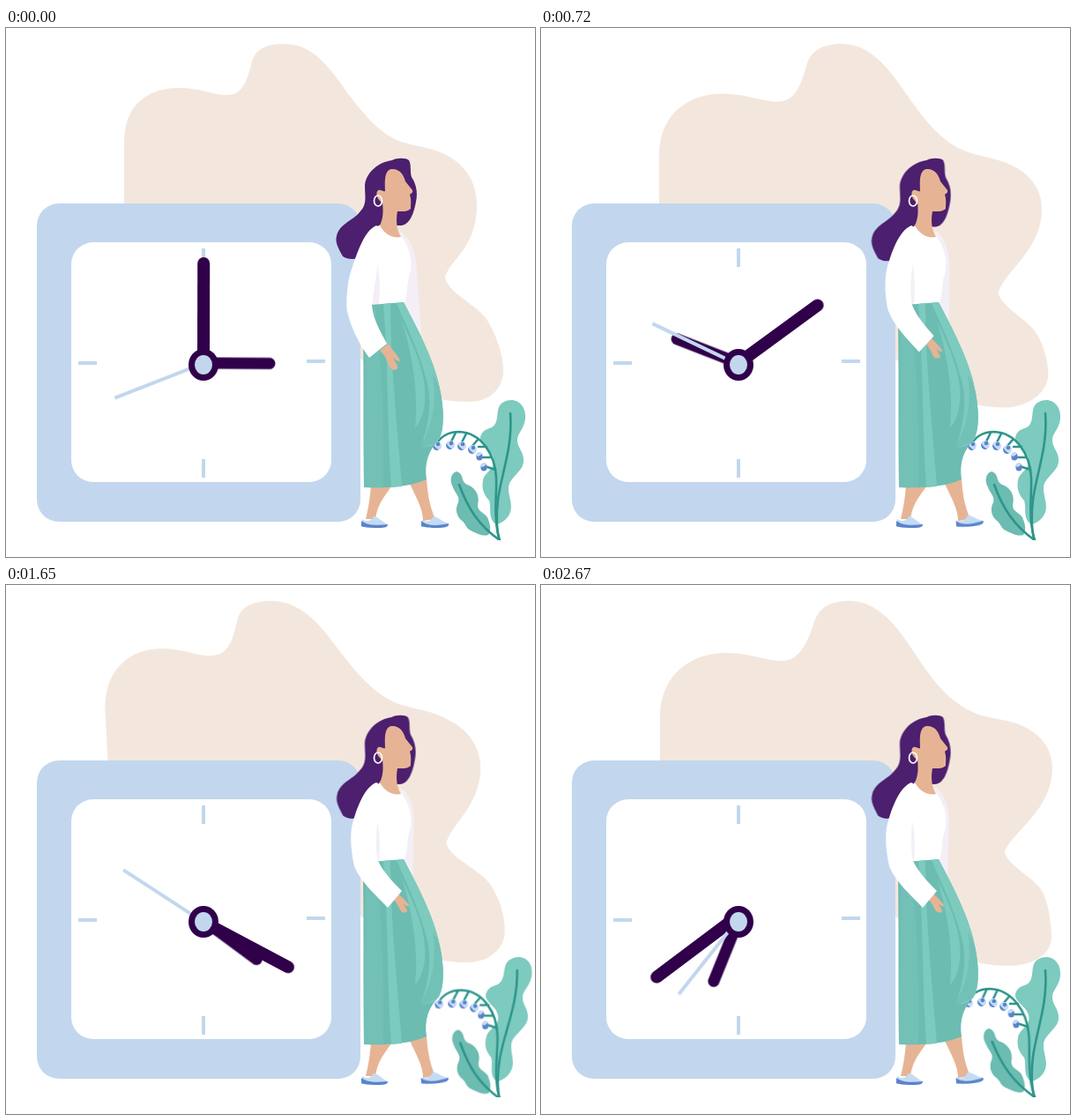
An HTML page that plays this animation: 600 by 600 pixels, repeating every 2.7 s.

```html
<!DOCTYPE html>
<html lang="en">
<head>
<meta charset="utf-8">
<title>Time passing</title>
<style>
html, body { margin: 0; width: 100%; height: 100%; overflow: hidden; background: #fff; }
svg { display: block; width: 100vw; height: 100vh; }

.blob, .arm, .hand, .back-arm, .hair, .shoe, .leaf, .stem, .clock-hand {
  animation: 2700ms linear infinite;
}

/* background shape */
.blob { fill: #f3e7dd; animation-name: blob; }
@keyframes blob {
  0% {
    d: path("M134 300L134 130C134 85 163 68 196 68C222 68 234 76 251 76C268 76 273 60 278 42C281 27 290 18 316 18C352 18 371 52 390 77C406 98 424 120 448 129C466 135 484 135 503 146C522 157 534 176 534 200C534 250 504 262 498 282C500 300 534 314 545 330C556 348 564 370 564 388C564 410 548 424 525 424C470 424 430 400 402 375L300 375Z");
    animation-timing-function: cubic-bezier(.33, .33, .6, 1);
  }
  33.33% {
    d: path("M134 300L134 145C134 98 168 75 206 75C234 75 250 84 270 84C290 84 296 64 302 45C306 27 318 18 343 18C380 18 403 56 423 85C441 110 459 131 483 140C501 147 520 148 539 158C558 168 570 184 570 206C570 252 526 278 520 301C523 318 555 332 564 349C572 362 576 382 576 393C576 416 549 431 526 431C470 431 430 402 402 375L300 375Z");
    animation-timing-function: cubic-bezier(.4, .15, .6, .95);
  }
  66.67% {
    d: path("M120 300L111 145C108 95 140 72 173 72C200 72 212 80 229 80C250 80 254 62 259 42C262 27 272 18 298 18C336 18 359 53 379 79C396 101 417 125 444 135C462 141 480 142 498 152C522 163 536 184 536 208C536 250 502 272 498 292C502 310 538 322 549 340C560 358 565 374 565 392C565 414 546 428 523 428C470 428 430 402 402 375L300 375Z");
    animation-timing-function: cubic-bezier(.4, .1, .6, 1);
  }
  100% {
    d: path("M135 300L135 150C135 100 172 77 210 77C238 77 254 86 273 86C295 86 303 62 309 45C314 27 326 18 350 18C388 18 411 58 431 88C450 116 468 135 494 146C513 153 530 152 549 161C568 171 580 186 580 208C580 256 532 282 526 303C530 320 562 332 570 350C576 364 579 386 579 400C579 420 556 432 530 432C474 432 430 404 402 376L300 375Z");
  }
}

/* clock */
.clock-hand { fill: none; stroke: #30004a; stroke-linecap: round; }
.hour { transform-origin: 224px 380px; stroke-width: 13; animation-name: hour; }
.minute { transform-origin: 222px 379px; stroke-width: 14; animation-name: minute; }
.second { transform-origin: 222px 381px; stroke: #c2d7ee; stroke-width: 4; stroke-linecap: butt; animation-name: second; }
@keyframes hour {
  0% { transform: rotate(90deg); animation-timing-function: cubic-bezier(.33, .38, .67, .71); }
  11.11% { transform: rotate(193.2deg); animation-timing-function: cubic-bezier(.33, .43, .67, .62); }
  26.67% { transform: rotate(291deg); animation-timing-function: cubic-bezier(.33, .32, .67, .72); }
  42.22% { transform: rotate(409deg); animation-timing-function: cubic-bezier(.33, .51, .67, .71); }
  61.11% { transform: rotate(486.4deg); animation-timing-function: cubic-bezier(.33, .38, .67, .73); }
  72.22% { transform: rotate(519.4deg); animation-timing-function: cubic-bezier(.33, .5, .67, .78); }
  98.89% { transform: rotate(562deg); }
  100% { transform: rotate(563.2deg); }
}
@keyframes minute {
  0% { transform: rotate(0deg); animation-timing-function: cubic-bezier(.33, .36, .67, .72); }
  11.11% { transform: rotate(28.2deg); animation-timing-function: cubic-bezier(.33, .43, .67, .68); }
  26.67% { transform: rotate(53.8deg); animation-timing-function: cubic-bezier(.33, .34, .67, .61); }
  42.22% { transform: rotate(77.3deg); animation-timing-function: cubic-bezier(.33, .27, .67, .64); }
  61.11% { transform: rotate(117.9deg); animation-timing-function: cubic-bezier(.33, .31, .67, .64); }
  72.22% { transform: rotate(146deg); animation-timing-function: cubic-bezier(.33, .28, .67, .64); }
  98.89% { transform: rotate(233deg); }
  100% { transform: rotate(237deg); }
}
@keyframes second {
  0% { transform: rotate(248.2deg); animation-timing-function: cubic-bezier(.33, .44, .67, .91); }
  11.11% { transform: rotate(339.6deg); animation-timing-function: cubic-bezier(.33, -.26, .67, .97); }
  26.67% { transform: rotate(295.6deg); animation-timing-function: cubic-bezier(.33, -.35, .67, .58); }
  42.22% { transform: rotate(299.7deg); animation-timing-function: cubic-bezier(.33, .7, .67, 3.5); }
  61.11% { transform: rotate(303.1deg); animation-timing-function: cubic-bezier(.33, .21, .67, .62); }
  72.22% { transform: rotate(279deg); }
  98.89% { transform: rotate(218.4deg); }
  100% { transform: rotate(216deg); }
}

/* woman */
.skin { fill: #e6b494; }
.lilac { fill: #f4eff7; }
.white { fill: #fff; }
.upper { fill: #c3dcf3; }
.sole { fill: #5b83cb; }
.light { fill: #7dcabf; }
.dark { fill: #6cbcb1; }
.hair { fill: #4c1f6f; transform-origin: 400px 148px; animation-name: hair; }
.arm { animation-name: arm; }
.hand { transform-origin: 430px 362px; animation-name: hand; }
.back-arm { transform-origin: 455px 240px; animation-name: back-arm; }
.shoe { transform-origin: 472px 564px; animation-name: shoe; }
@keyframes hair {
  33.33%, 100% { transform: scale(.98, 1.025); }
}
@keyframes arm {
  0% { d: path("M420 224C405 230 396 262 390 280C386 296 386 315 387 322C393 345 403 362 412 374L432 358C424 343 416 330 415 314C417 295 421 280 422 262C432 245 430 228 420 224Z"); }
  33.33%, 100% { d: path("M420 224C405 230 396 258 392 275C390 290 392 305 395 319C403 338 420 352 433 366L449 347C440 338 428 326 422 313C418 295 420 280 422 262C432 245 430 228 420 224Z"); }
}
@keyframes hand {
  33.33%, 100% { transform: translate(13px, -9px) scale(.85, .72); }
}
@keyframes back-arm {
  33.33%, 100% { transform: rotate(5.5deg); }
}
@keyframes shoe {
  26%, 100% { transform: rotate(-6deg); }
}

/* plant */
.leaf, .stem { transform-origin: 557px 580px; }
.leaf { animation-name: leaf; animation-timing-function: ease-in-out; }
.stem { animation-name: stem; animation-timing-function: ease-in-out; }
.vein { fill: none; stroke: #2e958a; stroke-width: 2.6; stroke-linecap: round; }
@keyframes leaf {
  0%, 26.67%, 98.89%, 100% { transform: skewX(0deg); }
  16.67% { transform: skewX(-2.4deg); }
  33.33% { transform: skewX(-3deg); }
  42.22% { transform: skewX(1.5deg); }
  60% { transform: skewX(-3deg); }
  65.9% { transform: skewX(-3.9deg); }
  72.22% { transform: skewX(-1.5deg); }
  84% { transform: skewX(.8deg); }
}
@keyframes stem {
  0%, 26.67% { transform: skewX(0deg); }
  14% { transform: skewX(-.7deg); }
  33.33% { transform: skewX(-.8deg); }
  42.22% { transform: skewX(.6deg); }
  61.11% { transform: translateY(1.5px) skewX(-1.2deg); }
  72.22% { transform: skewX(.2deg); }
  98.89%, 100% { transform: skewX(2.2deg); }
}
</style>
</head>
<body>
<svg viewBox="0 0 600 600">
  <defs>
    <clipPath id="ground"><rect width="600" height="581"/></clipPath>
    <g id="berry">
      <circle r="5" class="upper"/>
      <path class="sole" d="M-4.500 -2C-6 3 -2 6 2 4.500C-1 3 -3 1 -4.500 -2Z"/>
      <circle r="2.300" cx="1" cy="-2" fill="#5b83cb"/>
    </g>
    <g id="bud">
      <ellipse rx="3.600" ry="4.500" class="sole"/>
      <path class="upper" d="M-4 -1C-4 -5 2 -6 3 -3L-1 0Z"/>
    </g>
  </defs>

  <path class="blob"/>

  <rect x="35" y="199" width="367" height="361" rx="25" fill="#c2d7ee"/>
  <rect x="74" y="243" width="295" height="272" rx="25" fill="#fff"/>
  <path d="M224 250V271M224 489V510M82 380H103M341 378H362" stroke="#c2d7ee" stroke-width="4"/>
  <path class="clock-hand hour" d="M224 380V305"/>
  <path class="clock-hand minute" d="M224 382V267"/>
  <path class="clock-hand second" d="M222 381V275"/>
  <ellipse cx="224" cy="382" rx="17" ry="18" fill="#30004a"/>
  <ellipse cx="224" cy="382" rx="10" ry="11" fill="#c2d7ee"/>

  <g clip-path="url(#ground)">
    <g class="leaf">
      <path class="light" d="M573 422C583 422 590 431 589 443C588 455 579 460 580 469C581 477 588 482 587 492C586 504 570 510 570 522C570 532 575 540 572 549C569 558 561 562 556 563C546 556 551 545 548 536C543 530 539 524 541 513C543 503 556 500 553 488C551 478 537 473 538 464C540 456 546 455 551 453C559 448 556 438 559 430C561 425 567 422 573 422Z"/>
      <path class="vein" d="M572 437C575 475 562 505 558 535C556 552 556 566 559 580"/>
    </g>
    <g class="stem">
      <path class="dark" d="M511 503C504 505 503 514 507 521C510 529 515 531 513 538C509 546 511 553 516 558C522 562 521 567 527 570C534 573 540 577 547 575C551 570 549 562 546 555C542 549 535 549 535 541C537 533 535 527 530 522C525 517 520 519 518 512C517 507 515 504 511 503Z"/>
      <path class="vein" d="M514 518C524 545 536 564 560 581"/>
      <path class="vein" d="M560 581C552 555 557 530 556 510C555 484 539 459 514 458C500 458 492 465 489 471M510 459L505 469M522 460L517 470M535 467L529 474M545 475L536 475M551 487L541 487M555 501L546 498"/>
      <use href="#berry" x="489" y="474"/>
      <use href="#berry" x="504" y="473"/>
      <use href="#berry" x="517" y="474"/>
      <use href="#berry" x="529" y="478"/>
      <use href="#bud" x="537" y="486"/>
      <use href="#bud" x="542" y="498"/>
    </g>
  </g>

  <path class="skin" d="M414 519H438C430 530 421 540 419 557L408 557C411 545 413 532 414 519Z"/>
  <path class="skin" d="M458 517L477 511C478 526 480 542 487 557L473 559C473 545 465 532 458 517Z"/>
  <path class="upper" d="M404 557C408 560 414 560 417 554C422 554 426 560 433 563L431 566H403Z"/>
  <path class="sole" d="M403 559C411 565 422 564 433 563C433 567 428 567 418 567C411 567 406 566 403 565Z"/>
  <g class="shoe">
    <path class="upper" d="M472 558C476 561 482 560 485 554C490 554 494 560 502 562L500 566H471Z"/>
    <path class="sole" d="M471 559C479 566 491 564 502 562C503 566 498 567 487 567C480 567 474 566 471 565Z"/>
  </g>

  <path class="hair" d="M438 150C443 147 454 147 457 150C460 155 458 163 460 169C466 178 467 188 465 197C462 214 456 225 446 224L426 223C413 226 406 240 399 261C393 263 386 262 382 259C377 250 373 243 375 236C378 222 393 219 401 209C410 200 407 192 407 178C409 163 423 152 438 150Z"/>

  <path class="back-arm lilac" d="M446 230C459 238 465 254 466 275C467 300 470 325 471 348L456 330L445 300Z"/>
  <path class="white" d="M424 223C428 234 439 239 448 236C457 247 461 262 459 275C454 288 456 300 452 312L415 316L410 260Z"/>
  <path class="lilac" d="M421 267C425 285 424 300 423 315H415C416 297 419 281 421 267Z"/>
  <path class="skin" d="M437 160C446 159 451 166 453 174L461 184C462 187 459 188 458 189C460 195 459 200 459 205C455 209 449 208 444 208C442 218 443 229 448 237C438 239 429 233 424 224C428 216 428 207 427 198C422 196 418 188 422 184C426 183 428 186 430 185C430 177 428 162 437 160Z"/>
  <ellipse cx="422" cy="196" rx="4.500" ry="6" fill="none" stroke="#fff" stroke-width="1.700"/>

  <path class="dark" d="M414 314L451 311C469 345 488 382 493 414C497 436 497 456 491 467C480 478 474 493 477 512C457 521 430 522 406 521C405 460 406 400 405 335Z"/>
  <path class="light" d="M418 314C426 370 430 450 428 521C421 522 414 522 406 521C406 480 408 400 408 345Z" opacity=".3"/>
  <path class="light" d="M428 313L436 312C436 380 444 455 449 520L437 521C432 455 434 385 428 313Z"/>
  <path class="light" d="M443 312L451 311C469 345 488 382 493 414C497 436 497 456 491 467C483 476 478 475 470 476C478 455 485 425 476 396C467 363 453 336 443 312Z"/>
  <path class="light" d="M449 333C466 367 478 398 475 425C473 440 469 449 464 453C468 415 461 370 449 333Z"/>
  <path class="dark" d="M484 393C489 423 484 455 467 478L488 470C497 459 497 435 493 414C491 405 488 399 484 393Z" opacity=".6"/>

  <path class="hand skin" d="M424 366L433 358C437 364 443 369 447 377C445 380 442 376 439 374C441 379 445 383 444 386C441 389 437 388 435 384C432 378 431 372 424 366Z"/>
  <path class="arm white"/>
</svg>
</body>
</html>
```
